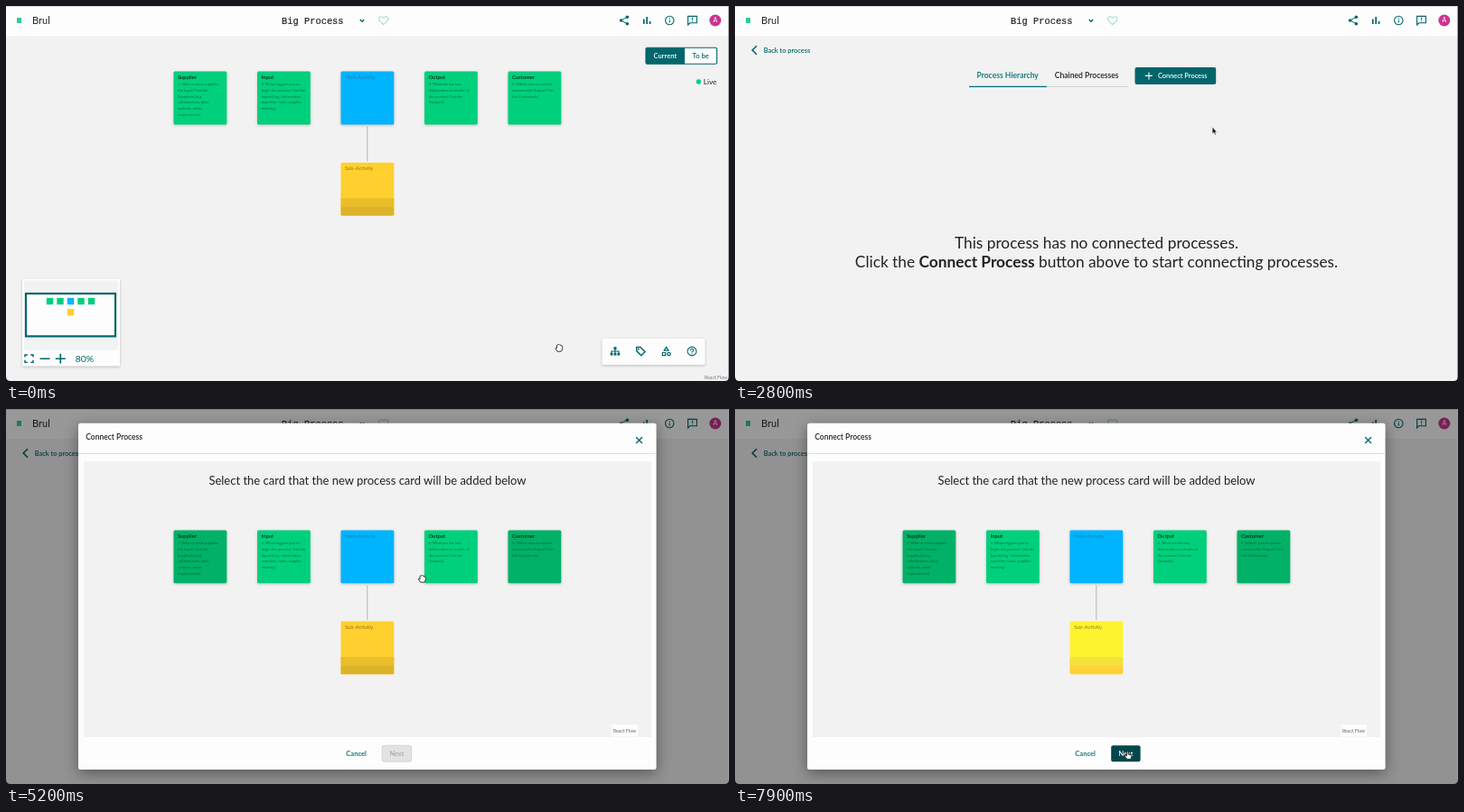
An HTML page that plays this animation: 800 by 416 pixels, repeating every 8000 ms.

```html
<!DOCTYPE html>
<html>
<head>
<meta charset="utf-8">
<style>
html, body { margin: 0; width: 100%; height: 100%; overflow: hidden; background: #f2f2f2; }
svg { display: block; width: 800px; height: 416px; font-family: Lato, "Open Sans", sans-serif; }
.line { fill: none; stroke: #00666a; stroke-width: 1.4; }
.soft { filter: drop-shadow(0 1px 1.5px rgba(0,0,0,.22)); }
.lift { filter: drop-shadow(0 1px 2px rgba(0,0,0,.6)); }
.deep { filter: drop-shadow(0 4px 8px rgba(0,0,0,.4)); }
</style>
</head>
<body>
<svg id="stage" viewBox="0 0 800 416"></svg>
<script>
const TEAL = '#00666a', DARK = '#00474b', GREEN = '#00d07c', DIM = '#00b167',
      BLUE = '#00b4ff', YELLOW = '#ffd02e', INK = '#222', PANE = '#f2f2f2', WHITE = '#fdfdfd';
const CARD = 58.8;

const rect = (x, y, w, h, fill, extra = '') =>
  `<rect x="${x}" y="${y}" width="${w}" height="${h}" fill="${fill}" ${extra}/>`;
const text = (x, y, size, str, fill = INK, extra = '') =>
  `<text x="${x}" y="${y}" font-size="${size}" fill="${fill}" ${extra}>${str}</text>`;
const line = (d, extra = '') => `<path class="line" d="${d}" ${extra}/>`;
const dot = (x, y, r, fill) => `<circle cx="${x}" cy="${y}" r="${r}" fill="${fill}"/>`;
const at = (x, y, body) => `<g transform="translate(${x} ${y})">${body}</g>`;
const group = (id, body) => `<g id="${id}">${body}</g>`;
const BOLD = 'font-weight="700"', SEMI = 'font-weight="600"', MID = 'text-anchor="middle"';

const steps = [
  ['Supplier', '1. Who or what supplies|the Input? List the|Supplier(s) (e.g.|collaborators, data,|systems, other,|requirements)'],
  ['Input', '2. What triggers you to|begin the process? List the|Input(s) (eg. information,|materials, tasks, supplier|meeting)'],
  ['Main Activity', ''],
  ['Output', '4. What are the key|deliverables or results of|the process? List the|Output(s)'],
  ['Customer', '5. Which user or system|receives the Output? List|the Customer(s)']
];

function stepCard([title, note], i, y, ends) {
  const x = 185.5 + 92.5 * i, main = i === 2;
  const fill = main ? BLUE : i % 4 ? GREEN : ends;
  const notes = note.split('|').map((s, n) =>
    text(x + 4.5, y + 15.4 + 6.8 * n, 4.2, s, '#003a22', 'opacity=".62"')).join('');
  return rect(x, y, CARD, CARD, fill, 'rx="1.5" class="soft"') +
    text(x + 4.5, y + 8.6, 5.8, title, main ? '#27647f' : '#06291b', main ? 'opacity=".6"' : SEMI) + notes;
}

function subCard(y, id, fill, low, lowest) {
  return group(id, rect(370.5, y, CARD, CARD, fill, 'rx="1.5"') +
    rect(370.5, y + 39.5, CARD, 10, low) + rect(370.5, y + 49.3, CARD, 9.5, lowest, 'rx="1"') +
    text(375, y + 8.6, 5.8, 'Sub-Activity', '#75621c', 'opacity=".8"'));
}

const board = (y, ends) => steps.map((s, i) => stepCard(s, i, y, ends)).join('') +
  line(`M399.8 ${y + 61}V${y + 99.5}`, 'style="stroke:#b4b4b4;stroke-width:1"');

const header = rect(0, 0, 800, 33, WHITE) + rect(0, 0, 800, 1, '#dcdcdc') +
  rect(12, 13, 5, 6, '#35c9a0') + text(29, 19.5, 11, 'Brul') +
  text(305, 19.5, 10.4, 'Big Process', INK, 'font-family="Liberation Mono, monospace" stroke="#222" stroke-width=".2"') +
  line('M391.8 15L394 17.2L396.2 15') +
  line('M417.7 20.5C409 14.5 413.5 9 417.7 13.2C422 9 426.5 14.5 417.7 20.5Z', 'style="stroke:#9edcc6;stroke-width:1.1"') +
  at(684, 16, dot(-3.4, 0, 1.8, TEAL) + dot(3.4, -3.8, 1.8, TEAL) + dot(3.4, 3.8, 1.8, TEAL) +
    line('M3.4 -3.8L-3.4 0L3.4 3.8', 'style="stroke-width:1"')) +
  line('M705.8 20V14.6M709.2 20V12M712.6 20V17', 'style="stroke-width:1.7"') +
  line('M739 16a4.7 4.7 0 1 0 -9.4 0a4.7 4.7 0 1 0 9.4 0M734.3 15.4V18.6M734.3 13.2V14.4', 'style="stroke-width:1.1"') +
  line('M754.6 21V11.4H764.4V18.8H756.8ZM759.5 12.8V15.6M759.5 16.4V17.5', 'style="stroke-width:1.1"') +
  dot(784.8, 16, 6.5, '#c9358f') + text(784.8, 18.4, 6.8, 'A', '#fff', MID);

const minimap = rect(18, 302.5, 108, 97, WHITE, 'class="soft"') + rect(20, 304.5, 104, 77, '#f1f2f2') +
  rect(22, 319, 99, 47.4, WHITE, `stroke="${TEAL}" stroke-width="2.2"`) +
  steps.map((s, i) => rect(44.8 + 11.5 * i, 323.8, 7.4, 7.4, i === 2 ? BLUE : GREEN)).join('') +
  rect(67.8, 336, 7.4, 7.4, YELLOW) +
  line('M21 389.5V387H23.8M27.2 387H30V389.5M30 392.8V395.4H27.2M23.8 395.4H21V392.8') +
  line('M37.5 391.2H48.5M54.8 391.2H65.8M60.3 385.8V396.6', 'style="stroke-width:1.6"') +
  text(76.8, 394.8, 10.4, '80%', TEAL);

const toolbar = rect(659.5, 369, 114, 29, WHITE, 'rx="1.5" class="soft"') +
  group('tool', rect(659.5, 369, 28.7, 29, '#d3e4e2')) +
  at(674, 383, line('M0 -2V2M-4 2V0H4V2', 'style="stroke-width:1.1"') + rect(-1.5, -4.8, 3, 3, TEAL) +
    [-5.3, -1.4, 2.5].map(x => rect(x, 1.8, 2.8, 2.8, TEAL)).join('')) +
  at(702.3, 383, line('M-4.6 -4.6H-.4L4.8 .6L.6 4.8L-4.6 -.4Z') + dot(-2.4, -2.4, 1, TEAL)) +
  at(730.6, 383, line('M0 -4.6L2.4 -.9H-2.4ZM-4.2 1.5H-.9V4.6H-4.2ZM4.6 3a1.7 1.7 0 1 0 -3.4 0a1.7 1.7 0 1 0 3.4 0', 'style="stroke-width:1.2"')) +
  at(759, 383, line('M4.9 0a4.9 4.9 0 1 0 -9.8 0a4.9 4.9 0 1 0 9.8 0M-1.7 -1C-1.7 -3.5 1.8 -3.3 1.7 -1C1.6 .3 0 .2 0 1.6M0 2.4V3.5', 'style="stroke-width:1.1"')) +
  group('tip', rect(645.5, 345, 57, 17, '#222', 'rx="2"') + '<path d="M671 361.5H677L674 364.5Z" fill="#222"/>' +
    text(674, 355.4, 6.4, 'Linked processes', '#fff', `${BOLD} ${MID}`));

const mapPage = board(72.6, GREEN) + subCard(173.8, 'sub', YELLOW, '#e9be2a', '#dcb32a') +
  rect(708, 46.3, 78.6, 18, WHITE, `rx="1.5" stroke="${TEAL}" stroke-width="1.1"`) + rect(708, 46.3, 43, 18, TEAL) +
  text(729.3, 58, 7.6, 'Current', '#fff', `${SEMI} ${MID}`) + text(768.7, 58, 7.6, 'To be', TEAL, `${SEMI} ${MID}`) +
  dot(766.4, 84, 2.7, GREEN) + text(771.8, 86.8, 8.2, 'Live') +
  minimap + toolbar + text(773, 414, 5.2, 'React Flow', '#777');

const linkPage = line('M24 44.3L19.2 49L24 53.8', 'style="stroke-width:1.6"') + text(31.8, 51.7, 7.4, 'Back to process', TEAL, SEMI) +
  text(301.7, 80, 8.6, 'Process Hierarchy', '#007377', `${SEMI} ${MID}`) +
  text(389.2, 80, 8.6, 'Chained Processes', INK, `${SEMI} ${MID}`) +
  rect(345, 89, 89.5, 1, '#cfcfcf') + rect(259, 88.8, 86, 1.3, '#007377') +
  rect(442.5, 68, 89.7, 19, TEAL, 'rx="2" id="connect"') +
  line('M453.8 77.4H461.8M458 73.4V81.4', 'style="stroke:#fff;stroke-width:1.1"') +
  text(468, 80, 7.4, 'Connect Process', '#fff', SEMI) +
  text(400, 269, 17.3, 'This process has no connected processes.', INK, MID) +
  text(400, 290, 17.3, `Click the <tspan ${BOLD}>Connect Process</tspan> button above to start connecting processes.`, INK, MID);

const modal = rect(0, 0, 800, 416, '#000', 'opacity=".4"') +
  rect(80, 15.8, 639.6, 384.2, WHITE, 'rx="2.5" class="deep"') +
  text(88.3, 34, 8.5, 'Connect Process', INK, SEMI) +
  line('M697.2 31.2L704 38M704 31.2L697.2 38', 'style="stroke-width:1.3"') +
  rect(80, 49, 639.6, 1, '#e0e0e0') + rect(86, 58, 628, 306, PANE) +
  text(400, 84.3, 13, 'Select the card that the new process card will be added below', INK, MID) +
  board(134.5, DIM) + subCard(235.5, 'plain', YELLOW, '#e9be2a', '#dcb32a') +
  subCard(235.5, 'picked', '#fdf42f', '#f3e23b', '#ffd23c') +
  rect(670, 350, 29, 13.5, WHITE) + text(672, 358.6, 5.2, 'React Flow', '#666') +
  text(387.6, 384.6, 7.6, 'Cancel', TEAL, `${SEMI} ${MID}`) +
  rect(416.2, 373.2, 32.4, 18, '#e2e2e2', 'rx="2" id="next" stroke-width=".8"') +
  text(432.4, 384.6, 7.4, 'Next', '#a8a8a8', `${SEMI} ${MID} id="nextText"`);

const frame = rect(799, 0, 1, 416, '#a0a0a0') +
  '<path d="M0 411Q0 416 5 416H0ZM800 411Q800 416 795 416H800Z" fill="#111"/>';

const shapes = {
  grab: 'M-2 4.2L-4.2 .7Q-3.7 -.6 -2.4 .6V-2.7Q-1.6 -3.8 -.9 -2.8Q-.1 -4.6 .8 -2.8Q2 -3.6 2.3 -2Q3.8 -2.3 3.7 -.6V1.8L2.4 4.2Z',
  point: 'M-1.6 1V-3.6Q-.7 -5 .1 -3.6V-.9L2.8 -.2Q4 .2 3.8 1.6L3.1 4.4H-1.2L-4 1Q-3.4 -.3 -1.6 1Z',
  arrow: 'M-1.3 -4.3V3.2L.4 1.8L1.7 4.5L2.9 4L1.6 1.4H3.7Z',
  beam: 'M-1.6 -4Q0 -4 0 -3V3Q0 4 -1.6 4M1.6 -4Q0 -4 0 -3M0 3Q0 4 1.6 4'
};

document.getElementById('stage').innerHTML = rect(0, 0, 800, 416, PANE) + header +
  group('mapPage', mapPage) + group('linkPage', linkPage) + group('modal', modal) + frame +
  '<path id="cursor" stroke-linejoin="round"/>';

// time, x, y, and the pointer shape from then on
const path = [
  [0, 612, 379, 'grab'], [500, 612, 379, 'grab'], [1000, 662, 389, 'point'], [1300, 671, 394, 'point'],
  [1600, 671, 394, 'arrow'], [2300, 671, 394, 'arrow'], [2800, 529.5, 138.5, 'arrow'], [3100, 512, 100, 'arrow'],
  [3200, 503, 90, 'point'], [3400, 497, 86, 'point'], [4000, 497, 86, 'point'], [4100, 497, 82, 'beam'],
  [4700, 497, 82, 'beam'], [4900, 484, 112, 'grab'], [5500, 437, 264, 'grab'], [5800, 425, 246, 'grab'],
  [6600, 425, 246, 'grab'], [6900, 424, 262, 'grab'], [7100, 424, 262, 'grab'], [7500, 432, 366, 'arrow'],
  [7700, 435, 384, 'point'], [8000, 435, 384, 'point']
];

const $ = id => document.getElementById(id);
const show = (id, on) => { $(id).style.display = on ? '' : 'none'; };

function draw(t) {
  const i = path.findIndex((k, n) => t >= k[0] && t < path[n + 1][0]);
  const [t0, x0, y0, kind] = path[i], [t1, x1, y1] = path[i + 1];
  const u = (t - t0) / (t1 - t0);
  const cursor = $('cursor'), beam = kind === 'beam';
  cursor.setAttribute('d', shapes[kind]);
  cursor.setAttribute('transform', `translate(${x0 + (x1 - x0) * u} ${y0 + (y1 - y0) * u})`);
  cursor.setAttribute('fill', beam ? 'none' : kind === 'arrow' ? '#111' : '#fff');
  cursor.setAttribute('stroke', kind === 'arrow' ? '#fff' : '#222');
  cursor.setAttribute('stroke-width', kind === 'arrow' ? .5 : .9);

  const picked = t >= 6300, over = t >= 7700;
  show('mapPage', t < 1600);
  show('linkPage', t >= 1600);
  show('modal', t >= 4100);
  show('tool', t >= 1000);
  show('tip', t >= 1100);
  show('plain', !picked);
  show('picked', picked);
  const lifted = t >= 5600 && t < 7300 ? 'lift' : '';
  $('plain').setAttribute('class', lifted);
  $('picked').setAttribute('class', lifted);
  $('connect').setAttribute('fill', t >= 3200 ? DARK : TEAL);
  $('next').setAttribute('fill', over ? DARK : picked ? TEAL : '#e2e2e2');
  $('next').setAttribute('stroke', picked ? 'none' : '#cfcfcf');
  $('nextText').setAttribute('fill', picked ? '#fff' : '#a8a8a8');
}

function tick() {
  draw(Math.floor(performance.now() % 8000 / 100) * 100);
  requestAnimationFrame(tick);
}
tick();
</script>
</body>
</html>
```
